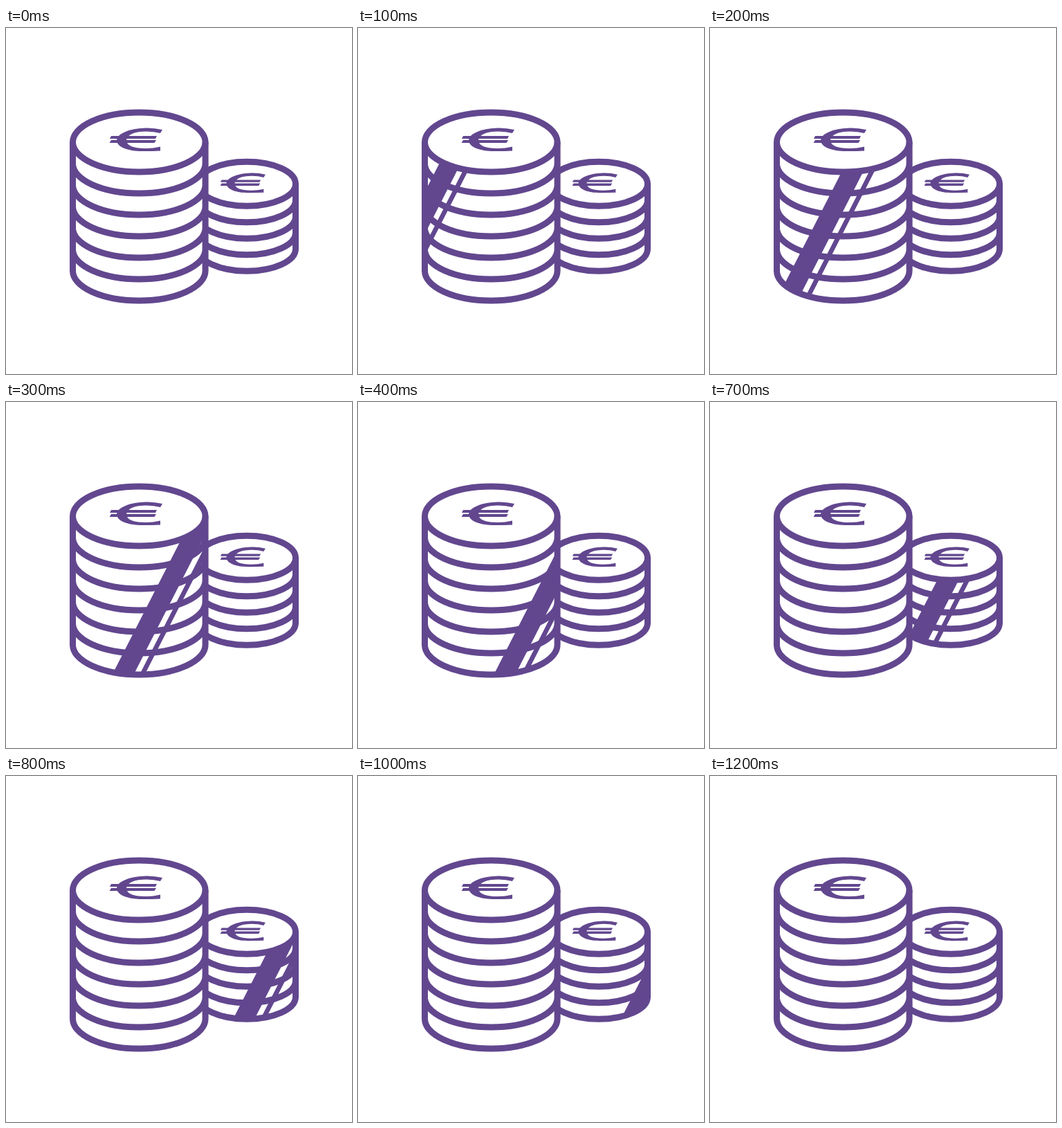
Animation of 500x500 px, one loop 2.5 s. Source, as an HTML page:

```html
<!DOCTYPE html>
<html lang="en">
<head>
<meta charset="utf-8">
<title>Coin stacks</title>
<style>
html, body { margin: 0; width: 100%; height: 100%; overflow: hidden; background: #fff; }
svg { display: block; width: 100%; height: 100%; }
</style>
</head>
<body>
<svg id="stage" viewBox="0 0 500 500">
  <defs>
    <g id="euro" fill="#62478f">
      <path d="M226 147Q213 144 202 144.5C180 145 161 152 160 162C160 172 176 178 197 178Q212 178 223 177.5V171.5Q212 174 202 174C184 174 174 170 174 162C175 154 186 149.5 203 149.5Q214 149.5 223 152Z"/>
      <path d="M152 156H218L216 160H150ZM152 162H217L214.500 166H149.500Z"/>
    </g>
  </defs>
</svg>
<script>
const LOOP = 2500, STEP = 50, SLOPE = 0.51;
const stage = document.getElementById('stage');

// base: y where the shine's x is measured; it glides towards `end`, being `gap` short at time `at`
const stacks = [
  { id: 'small', cx: 348, cy: 225.3, rx: 70.5, ry: 32, coins: 4, h: 23.5, base: 347,
    end: 421, gap: 39, at: 1000, tau: 237, mark: 'translate(181.700 86) scale(.855)' },
  { id: 'big', cx: 192.3, cy: 165, rx: 95.8, ry: 43, coins: 6, h: 31, base: 382,
    end: 321.5, gap: 64.5, at: 600, tau: 326, mark: '' }
];

function draw({ id, cx, cy, rx, ry, coins, h, base, mark }) {
  const left = cx - rx, right = cx + rx, bottom = cy + coins * h;
  const arc = y => `M${left} ${y}A${rx} ${ry} 0 0 0 ${right} ${y}`;
  const side = `${arc(cy)}V${bottom}A${rx} ${ry} 0 0 1 ${left} ${bottom}Z`;
  const band = (x, w) => {
    const rise = 260, dx = rise * SLOPE;
    return `M${x - 20 * SLOPE} ${base + 20}h${w}l${dx} ${-rise}h${-w}Z`;
  };
  let rims = '';
  for (let i = 1; i <= coins; i++) rims += arc(cy + i * h);
  stage.insertAdjacentHTML('beforeend', `
    <clipPath id="${id}Side"><path d="${side}"/></clipPath>
    <path d="${side}" fill="#fff"/>
    <g clip-path="url(#${id}Side)"><path id="${id}Shine" fill="#62478f" d="${band(0, 31)}${band(39.5, 7.5)}"/></g>
    <g stroke="#62478f" stroke-width="9" fill="none">
      <ellipse cx="${cx}" cy="${cy}" rx="${rx}" ry="${ry}" fill="#fff"/>
      <path d="${rims}M${left} ${cy}V${bottom}M${right} ${cy}V${bottom}"/>
    </g>
    <use href="#euro" transform="${mark}"/>`);
}

function frame(now) {
  const t = Math.floor(now % LOOP / STEP) * STEP;
  for (const { id, end, gap, at, tau } of stacks) {
    const x = end - gap * Math.exp((at - t) / tau);
    const shine = document.getElementById(id + 'Shine');
    shine.setAttribute('transform', `translate(${x} 0)`);
    shine.setAttribute('visibility', t > 0 && t < 1200 ? 'visible' : 'hidden');
  }
  requestAnimationFrame(frame);
}

stacks.forEach(draw);
let start;
requestAnimationFrame(now => {
  start = now;
  frame(now - start);
});
</script>
</body>
</html>
```
